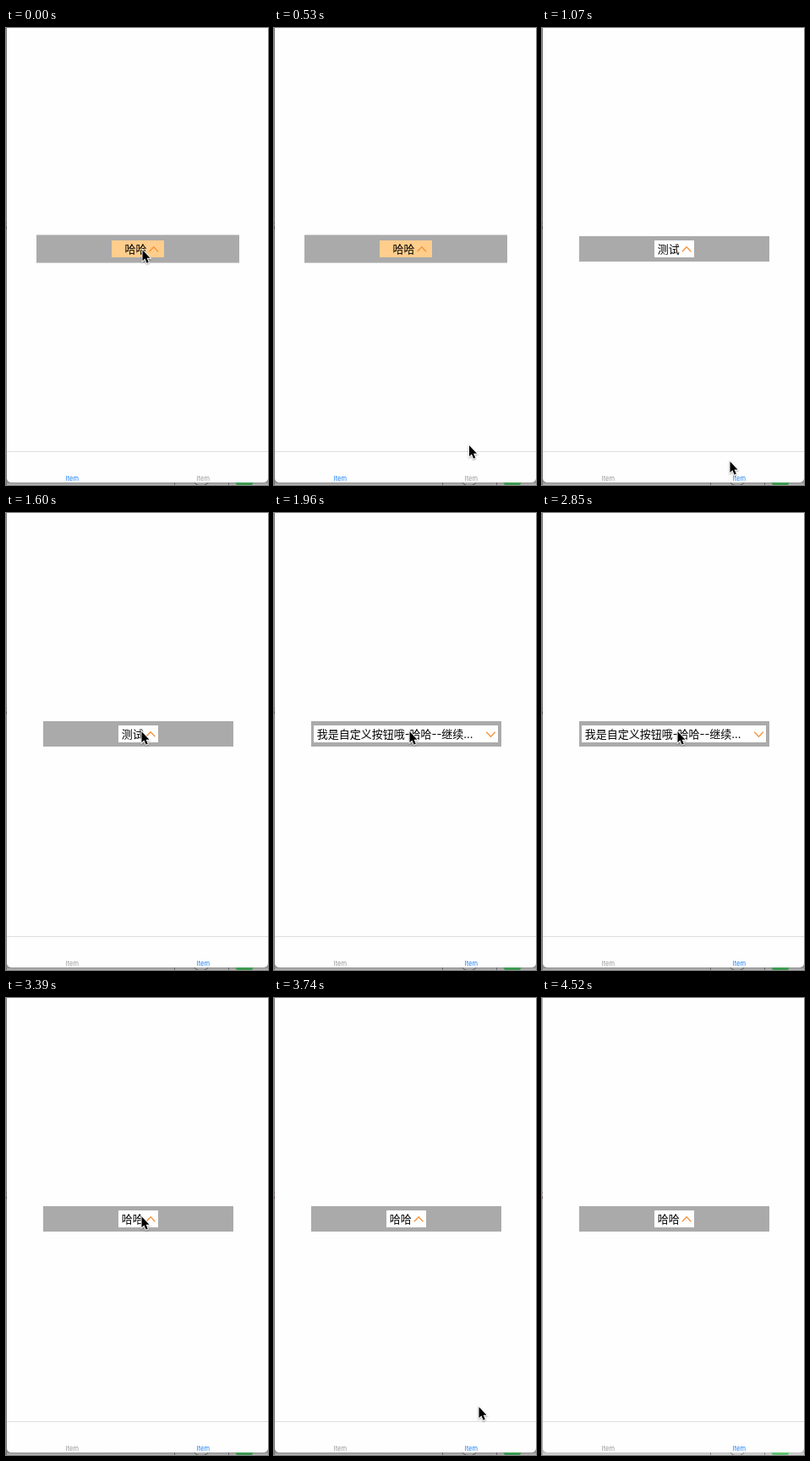
An HTML page with a canvas for the animation above (4.62 s loop, 310 by 540 pixels).

```html
<!DOCTYPE html>
<html lang="zh">
<head>
<meta charset="utf-8">
<title>Custom button demo</title>
<style>
html, body { margin: 0; width: 100%; height: 100%; overflow: hidden; background: #fff; }
canvas { display: block; width: 310px; height: 540px; }
</style>
</head>
<body>
<canvas id="stage"></canvas>
<script>
const W = 310, H = 540, LOOP = 4620, STEP = 178;
const CX = 156, CY = 261;
const canvas = document.getElementById('stage');
const ctx = canvas.getContext('2d');
const dpr = window.devicePixelRatio || 1;
canvas.width = W * dpr;
canvas.height = H * dpr;

const CJK = '13px "Noto Sans CJK SC", "Noto Sans CJK", sans-serif';
const LATIN = '13px Inter, sans-serif';

// Pointer strokes: one point per step, the last one is held.
const strokes = [
  { from: 0, path: [[160.5, 261], [214, 422], [217, 424], [230, 492], [217.5, 508], [221.5, 511]] },
  { from: 8, path: [[164, 272], [159.5, 257]] },
  { from: 20, path: [[213, 406], [241.5, 482], [251, 502], [271.5, 536], [282, 560]] }
];

function pointerAt(t) {
  const step = Math.floor((t + 8) / STEP);
  const { from, path } = strokes.findLast(s => s.from <= step);
  return path[Math.min(step - from, path.length - 1)];
}

// The second button is tapped open twice, at an even pace.
function isOpen(t) {
  const u = t - 1960;
  return u >= 0 && u < 1780 && u % 890 < 530;
}

function rect(x, y, w, h, color) {
  ctx.fillStyle = color;
  ctx.fillRect(x, y, w, h);
}

function centered(w, h, color) {
  const left = Math.round(CX - w / 2);
  rect(left, CY - h / 2, w, h, color);
  return left;
}

function disc(x, y, r, color) {
  ctx.beginPath();
  ctx.arc(x, y, r, 0, Math.PI * 2);
  ctx.fillStyle = color;
  ctx.fill();
}

function text(str, x, y, font, color, align = 'left') {
  ctx.font = font;
  ctx.fillStyle = color;
  ctx.textAlign = align;
  ctx.fillText(str, x, y);
}

function label(str, x) {
  for (const part of str.match(/[-…]+|[^-…]+/g)) {
    const latin = /[-…]/.test(part);
    text(part, x, 266.2, latin ? LATIN : CJK, '#000');
    x += latin ? part.length * 5.8 : part.length * 13;
  }
}

function chevron(x, dir) {
  const mid = 261.5, rise = 2.8 * dir;
  ctx.beginPath();
  ctx.moveTo(x - 5.3, mid + rise);
  ctx.lineTo(x, mid - rise);
  ctx.lineTo(x + 5.3, mid + rise);
  ctx.strokeStyle = '#f5923a';
  ctx.lineWidth = 1.25;
  ctx.stroke();
}

function desktop(active) {
  const shade = ctx.createLinearGradient(0, 537, 0, H);
  shade.addColorStop(0, active ? '#8e8e8e' : '#bcbcbc');
  shade.addColorStop(1, active ? '#bababa' : '#d8d8d8');
  rect(0, 0, W, H, shade);
  rect(0, 0, 1, H, active ? '#787878' : '#b0b0b0');
  text('S', 1.2, 239, 'bold 14px Inter, sans-serif', '#3a1210', 'right');
  const line = active ? '#666' : '#8c8c8c';
  rect(199, 537, 1, 3, line);
  rect(263, 537, 1, 3, line);
  disc(231, 531, 10.5, line);
  disc(231, 531, 9.5, active ? '#a8a8a8' : '#cdcdcd');
  disc(282, 532, 12, active ? '#3f9a52' : '#62c374');
}

function phone(second) {
  ctx.beginPath();
  ctx.roundRect(1, -10, W - 1, 547, [0, 0, 5, 5]);
  ctx.fillStyle = '#fefefe';
  ctx.fill();
  rect(1, 500, W - 1, 1, '#dedede');
  [78.3, 233.3].forEach((x, i) =>
    text('Item', x, 534.7, '7.5px Inter, sans-serif',
      second === (i === 1) ? '#157efb' : '#959595', 'center'));
}

function button(second, open, title) {
  centered(second ? 225 : 240, second ? 30 : 33, '#aaa');
  const width = open ? 218 : second ? 47 : 62;
  const left = centered(width, 20, second ? '#fff' : '#ffcd8c');
  const start = left + (second ? 3.8 : 15.5);
  label(title, start);
  chevron(open ? left + width - 8.5 : start + 34.3, open ? -1 : 1);
}

function arrow(x, y) {
  ctx.save();
  ctx.translate(x, y);
  ctx.beginPath();
  ctx.moveTo(1, 1.2);
  [[1, 14.2], [3.9, 11.6], [6.1, 16.8], [8.3, 15.8], [6.1, 10.8], [10, 10.8]]
    .forEach(p => ctx.lineTo(...p));
  ctx.closePath();
  ctx.shadowColor = 'rgba(0,0,0,.35)';
  ctx.shadowBlur = 2 * dpr;
  ctx.shadowOffsetY = dpr;
  ctx.lineWidth = 1.8;
  ctx.strokeStyle = '#fff';
  ctx.stroke();
  ctx.shadowColor = 'transparent';
  ctx.fillStyle = '#000';
  ctx.fill();
  ctx.restore();
}

function draw(t) {
  const second = t >= 1070, open = isOpen(t);
  const title = open ? '我是自定义按钮哦-哈哈--继续…'
    : second && t < 1960 ? '测试' : '哈哈';
  ctx.setTransform(dpr, 0, 0, dpr, 0, 0);
  desktop(t < 4520);
  phone(second);
  button(second, open, title);
  arrow(...pointerAt(t));
}

const start = performance.now();
function frame(now) {
  draw(Math.max(0, now - start) % LOOP);
  requestAnimationFrame(frame);
}
draw(0);
requestAnimationFrame(frame);
</script>
</body>
</html>
```
